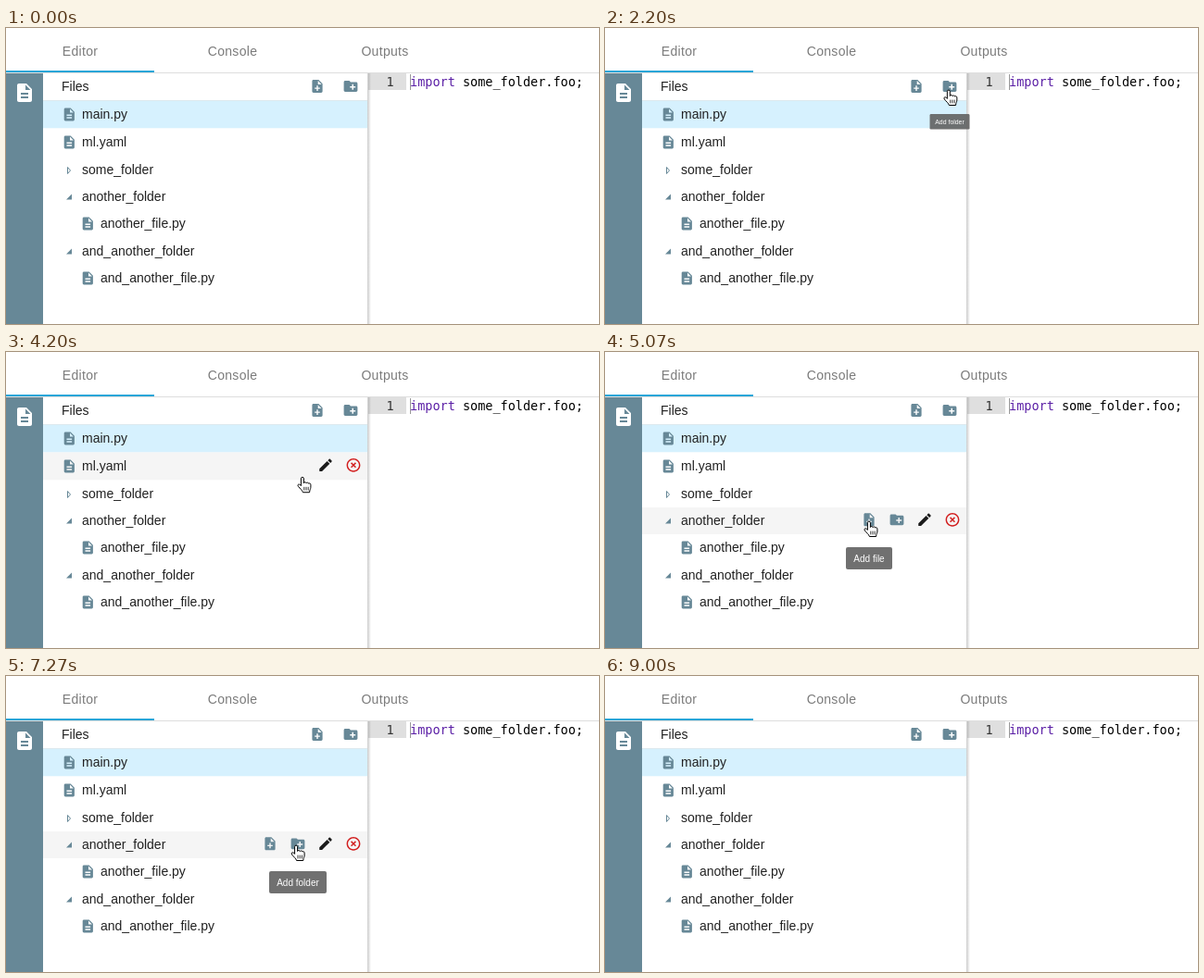
Write an HTML page that moves like this. It is 640 by 320 pixels and loops after 9070 ms.

```html
<!DOCTYPE html>
<html lang="en">
<head>
<meta charset="utf-8">
<title>File browser</title>
<style>
  html, body { margin: 0; width: 100%; height: 100%; overflow: hidden; background: #fff; }
  svg { display: block; width: 640px; height: 320px; }
  text { font: 14px "Liberation Sans", Arial, sans-serif; fill: #212121; white-space: pre; }
  .tab { fill: #7b7b7b; text-anchor: middle; letter-spacing: .3px; }
  .code { font: 13.5px "DejaVu Sans Mono", monospace; fill: #000; }
  .tip text { font-size: 10px; fill: #fff; text-anchor: middle; }
  .tip rect { fill: #616161; fill-opacity: .9; }
</style>
</head>
<body>
<svg viewBox="0 0 640 320">
  <defs>
    <path id="file" d="M14 2H6c-1.1 0-1.99.9-1.99 2L4 20c0 1.1.89 2 1.99 2H18c1.1 0 2-.9 2-2V8l-6-6zm2 16H8v-2h8v2zm0-4H8v-2h8v2zm-3-5V3.5L18.5 9H13z"/>
    <path id="addFile" d="M14 2H6c-1.1 0-1.99.9-1.99 2L4 20c0 1.1.89 2 1.99 2H18c1.1 0 2-.9 2-2V8l-6-6zm2 14h-3v3h-2v-3H8v-2h3v-3h2v3h3v2zm-3-7V3.5L18.5 9H13z"/>
    <path id="addFolder" d="M20 6h-8l-2-2H4c-1.11 0-1.99.89-1.99 2L2 18c0 1.11.89 2 2 2h16c1.11 0 2-.89 2-2V8c0-1.11-.89-2-2-2zm-1 8h-3v3h-2v-3h-3v-2h3V9h2v3h3v2z"/>
    <path id="edit" d="M3 17.25V21h3.75L17.81 9.94l-3.75-3.75L3 17.25zM20.71 7.04c.39-.39.39-1.02 0-1.41l-2.34-2.34c-.39-.39-1.02-.39-1.41 0l-1.83 1.83 3.75 3.75 1.83-1.83z"/>
    <path id="remove" d="M14.59 8L12 10.59 9.41 8 8 9.41 10.59 12 8 14.59 9.41 16 12 13.41 14.59 16 16 14.59 13.41 12 16 9.41 14.59 8zM12 2C6.47 2 2 6.47 2 12s4.47 10 10 10 10-4.47 10-10S17.53 2 12 2zm0 18c-4.41 0-8-3.59-8-8s3.59-8 8-8 8 3.59 8 8-3.59 8-8 8z"/>
    <linearGradient id="shade">
      <stop stop-color="#000" stop-opacity=".2"/>
      <stop offset="1" stop-color="#000" stop-opacity="0"/>
    </linearGradient>
  </defs>

  <rect width="640" height="320" fill="#fff"/>
  <text class="tab" x="80" y="30">Editor</text>
  <text class="tab" x="244.5" y="30">Console</text>
  <text class="tab" x="409" y="30">Outputs</text>
  <rect y="48" width="640" height="1" fill="#dedede"/>
  <rect y="46" width="160" height="2" fill="#29a6d8"/>
  <rect y="49" width="40" height="271" fill="#678897"/>

  <rect x="391" y="49" width="41" height="18" fill="#dfdfdf"/>
  <rect x="390" y="49" width="4" height="271" fill="url(#shade)"/>
  <text class="code" x="410.5" y="63" style="fill:#333">1</text>
  <rect x="436" y="50" width="1" height="17" fill="#999"/>
  <text class="code" x="436" y="63"><tspan fill="#5b1fa6">import</tspan> some_folder.foo;</text>

  <text x="60" y="68">Files</text>
  <rect x="40" y="78" width="350" height="1" fill="#e2e2e2"/>
  <g id="rows"></g>
  <g id="tips"></g>
  <g id="hand" fill="#fff" stroke="#000" stroke-linejoin="round" stroke-linecap="round">
    <path d="M-1.6 9V1.6a1.5 1.5 0 0 1 3 0V6.5c.2-1.4 2.6-1.3 2.7.1c.4-1.1 2.5-.9 2.6.5c.5-.8 2.2-.4 2.2 1V11c0 1.8-1.2 2.6-1.3 5.5H.4C0 14.3-2.8 12.5-4.6 10C-6 8.2-3.8 7-2.6 8.2Z"/>
    <path d="M1.8 11v3M4 11v3M6.2 11v3" stroke-width=".8"/>
  </g>
</svg>
<script>
const LOOP = 9070, FRAME = 200 / 3, SLATE = '#678897';
const byId = id => document.getElementById(id);

function add(parent, tag, attrs, text) {
  const node = document.createElementNS('http://www.w3.org/2000/svg', tag);
  for (const key in attrs) node.setAttribute(key, attrs[key]);
  if (text) node.textContent = text;
  return parent.appendChild(node);
}

function icon(parent, name, x, y, scale, fill = SLATE) {
  add(parent, 'use', {
    href: '#' + name, fill,
    transform: `translate(${x} ${y}) scale(${scale}) translate(-12 -12)`
  });
}

// label, vertical centre, top, bottom, kind
const rows = [
  ['main.py', 93.5, 78.5, 108.5, 'file'],
  ['ml.yaml', 123.5, 108.5, 138.5, 'file'],
  ['some_folder', 153.5, 138.5, 168, 'closed'],
  ['another_folder', 182.5, 168, 197, 'open'],
  ['another_file.py', 211.5, 197, 227, 'child'],
  ['and_another_folder', 241.5, 227, 256, 'open'],
  ['and_another_file.py', 270.5, 256, 286, 'child']
].map(([label, y, top, bottom, kind], i) => {
  const group = byId('rows');
  const isFolder = kind === 'open' || kind === 'closed';
  const back = add(group, 'rect', { x: 40, y: top, width: 350, height: bottom - top });
  if (kind === 'closed') {
    add(group, 'path', { d: `M66.5 ${y - 3}l3 3.5-3 3.5z`, fill: 'none', stroke: SLATE });
  } else if (kind === 'open') {
    add(group, 'path', { d: `M71 ${y - 3}v6h-6z`, fill: SLATE });
  } else {
    icon(group, 'file', kind === 'child' ? 88.3 : 68.3, y, .7);
  }
  add(group, 'text', { x: kind === 'child' ? 102 : 82, y: y + 4.7 }, label);

  const tools = add(group, 'g', {});
  if (isFolder) {
    icon(tools, 'addFile', 285, y - 1.2, .7);
    icon(tools, 'addFolder', 315, y - 1.2, .74);
  }
  icon(tools, 'edit', 345, y - 1.2, .75, '#1b1b1b');
  icon(tools, 'remove', 375, y - 1.2, .74, '#d21f1f');
  return { top, bottom, back, tools, base: i ? '#fff' : '#d6f1fe' };
});

icon(byId('rows'), 'file', 20, 70, 1, '#fff');
icon(byId('rows'), 'addFile', 336, 63, .7);
icon(byId('rows'), 'addFolder', 372, 63, .74);

// label, centre, top, width, shown at, hidden at
const tips = [
  ['Add file', 336, 93, 50, 950, 2040],
  ['Add folder', 372, 93, 62, 2149, 3880],
  ['Add file', 285, 211, 50, 4630, 6261],
  ['Add folder', 315, 211, 62, 6262, 8021]
].map(([label, x, y, width, start, end]) => {
  const node = add(byId('tips'), 'g', { class: 'tip' });
  add(node, 'rect', { x: -width / 2, width, height: 24, rx: 2 });
  add(node, 'text', { y: 15.7 }, label);
  return { node, x, y, start, end };
});

// Cubic bezier easing with control points (x1, 0) and (x2, 1)
function ease(p, x1, x2) {
  if (p <= 0) return 0;
  if (p >= 1) return 1;
  let low = 0, high = 1, s;
  for (let i = 0; i < 24; i++) {
    s = (low + high) / 2;
    const x = 3 * (1 - s) ** 2 * s * x1 + 3 * (1 - s) * s * s * x2 + s ** 3;
    if (x < p) low = s; else high = s;
  }
  return s * s * (3 - 2 * s);
}

// time, x, y of the fingertip
const path = [
  [250, 350, 335], [850, 335, 67], [1980, 335, 67], [2130, 371, 67],
  [3600, 370, 67], [3800, 370, 67], [4480, 285, 183], [6130, 285, 183],
  [6260, 312, 183], [7950, 314, 183], [8070, 316, 233], [8290, 320, 335]
];

function pointer(t) {
  const i = path.findIndex(p => p[0] > t);
  if (i < 1) return { x: 0, y: 400 };
  const [t0, x0, y0] = path[i - 1], [t1, x1, y1] = path[i];
  const k = (t - t0) / (t1 - t0);
  return { x: x0 + (x1 - x0) * k, y: y0 + (y1 - y0) * k };
}

function draw(t) {
  const { x, y } = pointer(t);
  byId('hand').setAttribute('transform', `translate(${x} ${y})`);

  // Row highlighting trails the pointer slightly
  const hoverY = pointer(t - 60).y;
  for (const row of rows) {
    const hover = hoverY >= row.top && hoverY < row.bottom;
    row.back.setAttribute('fill', hover ? '#f5f5f5' : row.base);
    row.tools.setAttribute('visibility', hover ? 'visible' : 'hidden');
  }

  for (const tip of tips) {
    const scale = t < tip.end
      ? ease((t - tip.start) / 150, 0, .2)
      : 1 - ease((t - tip.end) / 150, .4, 1);
    tip.node.setAttribute('visibility', scale > 0 ? 'visible' : 'hidden');
    tip.node.setAttribute('transform', `translate(${tip.x} ${tip.y}) scale(${scale})`);
  }
}

const begin = performance.now();
function tick() {
  const t = Math.max(0, performance.now() - begin) % LOOP;
  draw(Math.floor((t + 4) / FRAME) * FRAME);
  requestAnimationFrame(tick);
}
tick();
</script>
</body>
</html>
```
